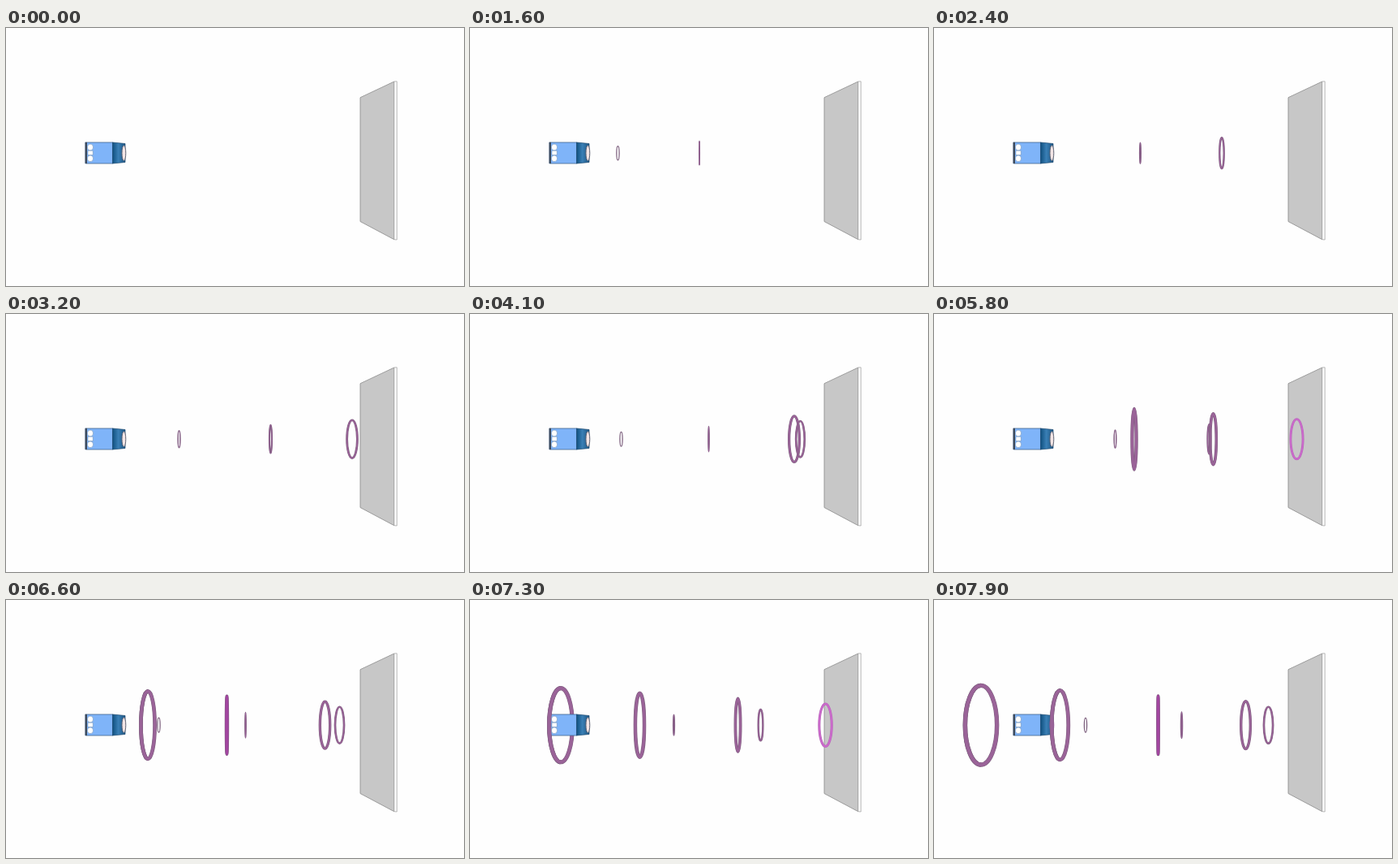
An HTML page with a canvas that plays this animation: 565 by 318 pixels, repeating every 8000 ms.

```html
<!DOCTYPE html>
<html lang="en">
<head>
<meta charset="utf-8">
<title>Ultrasonic sensor</title>
<style>
html, body { margin: 0; width: 100%; height: 100%; overflow: hidden; background: #fefefe; }
canvas { display: block; width: 565px; height: 318px; }
</style>
</head>
<body>
<canvas id="stage"></canvas>
<script>
const W = 565, H = 318, LOOP = 8000, STEP = 100;
const CY = 154.2, EYE_X = 282, EYE_DIST = 510;
const SPEED = 0.09, EXIT_X = 139;
// Each pulse: [emission time, turning time]
const PULSES = [[0, 3500], [1117, 4600], [2372, 5900], [3572, 7100],
                [4861, 8400], [6050, 9600], [7367, 10900]];

const canvas = document.getElementById('stage');
const ctx = canvas.getContext('2d');
const dpr = window.devicePixelRatio || 1;
canvas.width = W * dpr;
canvas.height = H * dpr;

function poly(points, fill, stroke, width = 0.8) {
  ctx.beginPath();
  points.forEach(([x, y]) => ctx.lineTo(x, y));
  ctx.closePath();
  ctx.fillStyle = fill;
  ctx.fill();
  if (stroke) {
    ctx.strokeStyle = stroke;
    ctx.lineWidth = width;
    ctx.stroke();
  }
}

function oval(x, y, rx, ry, fill, stroke, width) {
  ctx.beginPath();
  ctx.ellipse(x, y, rx, ry, 0, 0, Math.PI * 2);
  if (fill) {
    ctx.fillStyle = fill;
    ctx.fill();
  }
  if (stroke) {
    ctx.strokeStyle = stroke;
    ctx.lineWidth = width;
    ctx.stroke();
  }
}

function drawWall() {
  ctx.lineJoin = 'round';
  poly([[437, 85.7], [478.8, 66], [478.8, 260.7], [437, 238.5]], '#c7c7c7', '#8c8c8c');
  poly([[478.8, 66], [482.2, 65.8], [482.2, 261], [478.8, 260.7]], '#fdfdfd', '#9a9a9a', 0.7);
}

function drawSensor(hit) {
  poly([[98, 141], [132, 141], [132, 167], [98, 167]], '#7fb4f9', '#42658f', 0.8);
  poly([[97.7, 140.8], [100, 141], [100, 167], [97.7, 166.8]], '#3d4a5c');
  oval(104, 147, 3.6, 3.9, '#fff', '#5f82ac', 0.5);
  oval(104, 160.8, 3.6, 3.9, '#fff', '#5f82ac', 0.5);
  poly([[101, 151.2], [107.3, 151.2], [107.3, 156.6], [101, 156.6]], '#fff', '#5f82ac', 0.5);

  const shade = ctx.createLinearGradient(131, 0, 148, 0);
  shade.addColorStop(0, '#0d4d7c');
  shade.addColorStop(0.45, '#3a7fb5');
  shade.addColorStop(1, '#174f7c');
  poly([[131.5, 141], [147, 142.5], [147, 165.5], [131.5, 167]], shade, '#1d4a70', 0.7);
  oval(145.4, CY, 2.4, 9.4, hit ? '#d860d2' : '#f3e6e6', hit ? '#a052a4' : '#5f6474', 1);
}

function pulseAt(t, [start, turn]) {
  const back = t > turn;
  const peak = EXIT_X + (turn - start) * SPEED;
  const x = peak - Math.abs(t - turn) * SPEED;
  const outer = 6.5 + 0.0057 * (t - start);
  const width = Math.max(1, 0.1 * outer + 0.3);
  const ry = outer - width / 2;
  const dx = x - EYE_X;
  const rx = Math.max(0.1, ry * Math.abs(dx) / Math.hypot(dx, EYE_DIST));
  return { x, rx, ry, width, back };
}

function drawRing({ x, rx, ry, width }) {
  const lit = x > 438;
  oval(x, CY, rx, ry, null, lit ? '#b667b8' : '#7c5f7d', width);
  if (width > 1.3) {
    const core = lit ? '#cb6acb' : Math.abs(x - EYE_X) < 14 && ry > 28 ? '#a246a0' : '#9a6398';
    oval(x, CY, rx, ry, null, core, width - 1);
  }
}

function draw(t) {
  ctx.setTransform(dpr, 0, 0, dpr, 0, 0);
  ctx.fillStyle = '#fefefe';
  ctx.fillRect(0, 0, W, H);
  drawWall();

  const rings = PULSES.filter(p => t >= p[0]).map(p => pulseAt(t, p));
  rings.forEach(drawRing);
  drawSensor(rings.some(r => r.back && Math.abs(r.x - 146) < 15));

  // The near half of a returning ring passes in front of the sensor.
  for (const r of rings.filter(r => r.back && r.x < 190)) {
    ctx.save();
    ctx.beginPath();
    ctx.rect(0, 0, r.x, H);
    ctx.clip();
    drawRing(r);
    ctx.restore();
  }
}

const begin = performance.now();
function tick() {
  const t = (performance.now() - begin) % LOOP;
  draw(Math.floor(t / STEP) * STEP);
  requestAnimationFrame(tick);
}
tick();
</script>
</body>
</html>
```
